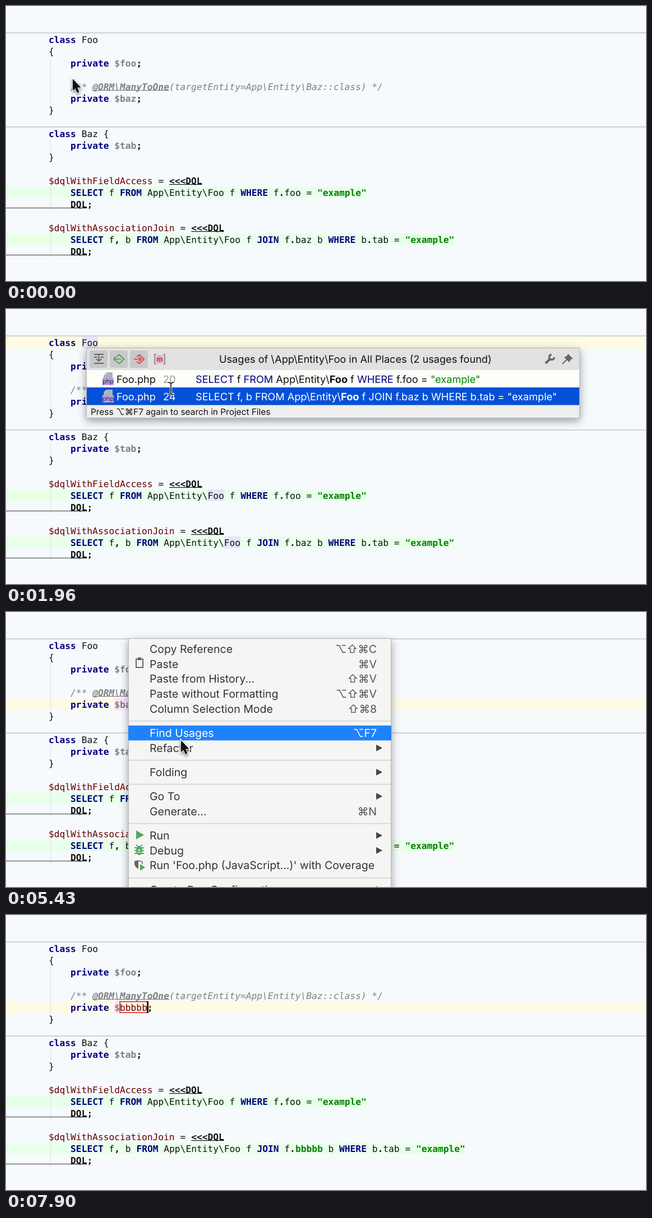
An HTML page with a canvas for the animation above (8 s loop, 1141x491 px).

```html
<!DOCTYPE html>
<html lang="en">
<head>
<meta charset="utf-8">
<title>Find usages and rename</title>
<style>
  html, body { margin: 0; width: 100%; height: 100%; overflow: hidden; background: #f6fafd; }
  canvas { display: block; width: 100%; height: 100%; }
</style>
</head>
<body>
<canvas id="stage" width="1141" height="491"></canvas>
<script>
const ctx = document.getElementById('stage').getContext('2d');
ctx.textRendering = 'geometricPrecision';

const W = 1141, H = 491, LOOP = 8000;
const LEFT = 76, CHAR = 9.775, ROW = 21, TOP = 49, BASE = 16.5;
const MONO = '16.23px "DejaVu Sans Mono", monospace';
const INTER = 'Inter, "DejaVu Sans", sans-serif';
const SMALL = '15.4px ' + INTER, MEDIUM = '18.15px ' + INTER, LARGE = '19.5px ' + INTER;
const NAVY = '#000080', GREEN = '#008000', GREY = '#808080', MAROON = '#660000';

const colX = col => LEFT + col * CHAR;
const rowY = row => TOP + row * ROW;

function rect(x, y, w, h, color) {
  ctx.fillStyle = color;
  ctx.fillRect(x, y, w, h);
}

function text(str, x, y, font, color, align = 'left') {
  ctx.font = font;
  ctx.fillStyle = color;
  ctx.textAlign = align;
  ctx.fillText(str, x, y);
}

function poly(points, fill, stroke, width = 1.5) {
  ctx.beginPath();
  points.forEach(([x, y]) => ctx.lineTo(x, y));
  ctx.closePath();
  if (stroke) { ctx.strokeStyle = stroke; ctx.lineWidth = width; ctx.stroke(); }
  if (fill) { ctx.fillStyle = fill; ctx.fill(); }
}

function line(points, color, width = 2) {
  ctx.beginPath();
  points.forEach(([x, y]) => ctx.lineTo(x, y));
  ctx.strokeStyle = color;
  ctx.lineWidth = width;
  ctx.stroke();
}

function disc(x, y, r, color) {
  ctx.fillStyle = color;
  ctx.beginPath();
  ctx.arc(x, y, r, 0, 7);
  ctx.fill();
}

function panel(x, y, w, h, color) {
  ctx.save();
  ctx.shadowColor = 'rgba(0,0,0,.38)';
  ctx.shadowBlur = 14;
  ctx.shadowOffsetY = 5;
  rect(x, y, w, h, color);
  ctx.restore();
  ctx.strokeStyle = '#b9b9b9';
  ctx.lineWidth = 1;
  ctx.strokeRect(x + .5, y + .5, w - 1, h - 1);
}

// Editor

const TOKEN = /(class|private|SELECT|FROM|JOIN|WHERE)\b|(".*?")|(\$dql\w+)|(\$\w*)|(<<<DQL|DQL)|(@ORM\\\w+)|(\/\*\* |\(target.*)|([;,.])|((?<=JOIN f\.)\w+)|./g;
const STYLES = [
  ['', '#111'], ['bold', NAVY], ['bold', GREEN], ['', MAROON], ['bold', GREY], ['bold', '#111', true],
  ['italic bold', GREY, true], ['italic', GREY], ['bold', '#111'], ['', '#111']
];
const JOIN_NAME = 9;

const codeLines = (name, renaming) => [
  'class Foo', '{', '    private $foo;', '',
  '    /** @ORM\\ManyToOne(targetEntity=App\\Entity\\Baz::class) */',
  `    private $${renaming ? ' '.repeat(name.length) : name};`, '}', '',
  'class Baz {', '    private $tab;', '}', '',
  '$dqlWithFieldAccess = <<<DQL',
  '    SELECT f FROM App\\Entity\\Foo f WHERE f.foo = "example"', '    DQL;', '',
  '$dqlWithAssociationJoin = <<<DQL',
  `    SELECT f, b FROM App\\Entity\\Foo f JOIN f.${name} b WHERE b.tab = "example"`, '    DQL;'
];

function drawLine(str, row, renaming) {
  const base = rowY(row) + BASE;
  for (const match of str.matchAll(TOKEN)) {
    const kind = Math.max(0, match.findIndex((g, i) => i && g !== undefined));
    const [weight, color, underline] = STYLES[kind === JOIN_NAME && renaming ? 2 : kind];
    const x = colX(match.index);
    text(match[0], x, base, `${weight} ${MONO}`, color);
    if (underline) rect(x, base + .5, match[0].length * CHAR, 1.2, color);
  }
}

const mark = (row, col, length, color) => rect(colX(col), rowY(row), length * CHAR, ROW, color);

function typedName(t) {
  const count = [6830, 6930, 7130, 7300, 7500].filter(at => t >= at).length;
  return count ? 'b'.repeat(count) : 'baz';
}

function caretAt(t, name) {
  if (t < 760) return null;
  if (t < 2030) return [0, 7];
  if (t < 3930) return [17, 32];
  if (t < 4760) return [0, 6];
  return [5, t < 6830 ? 15 : 13 + name.length];
}

function drawEditor(t) {
  const name = typedName(t), renaming = t >= 6450, caret = caretAt(t, name);
  const lines = codeLines(name, renaming);
  rect(0, 0, W, H, '#f6fafd');
  if (caret) rect(0, rowY(caret[0]), W, ROW, '#fffae3');
  for (const row of [13, 17]) rect(0, rowY(row) + .5, colX(lines[row].length), ROW - .5, '#e8ffe9');
  for (const y of [47.5, 215.5]) rect(0, y, W, 1, '#a9adb0');
  for (const [row, count] of [[2, 4], [9, 1], [13, 2], [17, 2]])
    rect(79, rowY(row), 1, count * ROW, '#dbdfe2');
  for (const row of [14, 18]) rect(0, rowY(row) + BASE + .5, colX(4), 1.2, '#555');

  if (t >= 1030 && t < 4760)
    for (const [row, col] of [[0, 6], [13, 29], [17, 32]]) mark(row, col, 3, '#e5e5fb');
  if (t >= 4760) mark(5, 12, renaming ? 1 : 4, '#ffe4f7');
  if (renaming && t < 7830) mark(17, 45, name.length, '#c6c8f5');

  lines.forEach((str, row) => drawLine(str, row, renaming));

  if (renaming) {
    const selected = t < 6830;
    if (selected) mark(5, 13, 3, '#3f6fb4');
    text(name, colX(13), rowY(5) + BASE, MONO, selected ? '#fff' : MAROON);
    ctx.strokeStyle = '#e0161c';
    ctx.lineWidth = 1.5;
    ctx.strokeRect(colX(13), rowY(5) + .7, name.length * CHAR, ROW - 1.4);
  }
  const popupOpen = t >= 1130 && t < 2030;
  if (caret && !popupOpen) rect(colX(caret[1]) - .6, rowY(caret[0]), 2.6, ROW, '#000');
}

// Usages popup

function fileIcon(x, y) {
  poly([[x + 7, y], [x + 17, y], [x + 17, y + 12], [x + 1, y + 12], [x + 1, y + 6]], '#a9b4bc');
  poly([[x + 1, y + 5], [x + 6, y], [x + 6, y + 5]], '#c6ced4');
  rect(x - 1, y + 10, 20, 13, '#b9a0e0');
  text('php', x + 9, y + 19.5, `11px ${INTER}`, '#2d2146', 'center');
}

// A diamond open on its left side, with an arrow leaving (-1) or entering (1)
function diamondIcon(x, y, color, direction) {
  ctx.save();
  ctx.translate(x, y);
  line([[-4, -4], [1, -8], [9, 0], [1, 8], [-4, 4]], color);
  line([[-9, 0], [4, 0]], color);
  const tip = direction < 0 ? -9 : 4, back = tip - 4 * direction;
  line([[back, -4], [tip, 0], [back, 4]], color);
  ctx.restore();
}

function popupToolbar() {
  for (const x of [149, 185, 221]) {
    ctx.fillStyle = '#c8c8c8';
    ctx.beginPath();
    ctx.roundRect(x, 74, 32, 31, 4);
    ctx.fill();
  }
  for (const y of [81, 97]) line([[157, y], [174, y]], '#666');
  line([[157, 86], [162, 86]], '#666');
  line([[169, 86], [174, 86]], '#666');
  line([[165.5, 82], [165.5, 92]], '#666');
  line([[161, 89], [165.5, 93], [170, 89]], '#666');
  diamondIcon(201, 89.5, '#4fa35b', -1);
  diamondIcon(237, 89.5, '#e0474c', 1);
  disc(274, 89.5, 7.5, '#f4a3ae');
  text('m', 274, 94, `12px ${INTER}`, '#4d2730', 'center');
  line([[268, 81], [265, 81], [265, 98], [268, 98]], '#777', 1.5);
  line([[280, 81], [283, 81], [283, 98], [280, 98]], '#777', 1.5);

  line([[962, 97], [971, 88]], '#666', 4);
  ctx.beginPath();
  ctx.arc(973, 86, 4.5, .1, 4.6);
  ctx.lineWidth = 3.5;
  ctx.stroke();
  poly([[1002, 80], [1011, 89], [1007, 90], [1004, 95], [995, 86], [1000, 84]], '#666');
  line([[1000, 90], [992, 98]], '#666', 2);
}

function usageRow(y, number, query, selected) {
  if (selected) rect(144, y, 878, 31.5, '#0550d8');
  fileIcon(173, y + 4);
  const base = y + 22.5;
  text('Foo.php', 197, base, MEDIUM, selected ? '#fff' : '#111');
  text(number, 280, base, MEDIUM, selected ? '#fff' : '#999');
  let x = 338;
  for (const part of query.split(/(SELECT|FROM|JOIN|WHERE|Foo|".*")/)) {
    const color = part[0] === '"' ? GREEN : /^[A-Z]+$/.test(part) ? NAVY : '#111';
    text(part, x, base, (part === 'Foo' ? 'bold ' : '') + MEDIUM, selected ? '#fff' : color);
    x += ctx.measureText(part).width;
  }
}

function drawUsages(t) {
  if (t < 1130 || t >= 2000) return;
  panel(143, 69, 880, 126, '#fdfdfa');
  rect(144, 70, 878, 39, '#e1e1e1');
  popupToolbar();
  text('Usages of \\App\\Entity\\Foo in All Places (2 usages found)', 380, 95.5, MEDIUM, '#111');
  rect(144, 171, 878, 23, '#eeeeee');
  const second = t >= 1960;
  usageRow(109, '20', 'SELECT f FROM App\\Entity\\Foo f WHERE f.foo = "example"', !second);
  usageRow(140, '24', 'SELECT f, b FROM App\\Entity\\Foo f JOIN f.baz b WHERE b.tab = "example"', second);
  text('Press ⌥⌘F7 again to search in Project Files', 151, 189, SMALL, '#111');
}

// Menus: each entry is [centre y, label, shortcut]; '>' opens a submenu

const MENU = [
  [66, 'Copy Reference', '⌥⇧⌘C'], [92.7, 'Paste', '⌘V'], [119.3, 'Paste from History...', '⇧⌘V'],
  [146, 'Paste without Formatting', '⌥⇧⌘V'], [172.5, 'Column Selection Mode', '⇧⌘8'],
  [216, 'Find Usages', '⌥F7'], [242.7, 'Refactor', '>'], [286, 'Folding', '>'],
  [329, 'Go To', '>'], [355.7, 'Generate...', '⌘N'], [399, 'Run', '>'], [425.7, 'Debug', '>'],
  [452.3, "Run 'Foo.php (JavaScript...)' with Coverage", ''], [495.5, 'Create Run Configuration', '>']
];
const SUBMENU = [
  [242.7, 'Rename...', '⇧F6'], [269.3, 'Move...', 'F6'], [296, 'Copy...', 'F5'], [322.7, 'Safe Delete...', '⌘⌫'],
  [366, 'Extract', '>'], [392.7, 'Inline...', '⌥⌘N'],
  [436, 'Pull Members Up...', ''], [462.7, 'Push Members Down...', '']
];

function menu(entries, separators, x, y, w, isActive) {
  panel(x, y, w, H + 40 - y, '#f5f5f4');
  for (const sep of separators) rect(x + 1, sep - 1, w - 2, 2.5, '#dedede');
  for (const [cy, label, key] of entries) {
    const active = isActive(cy, label);
    if (active) rect(x, cy - 13.3, w, 26.6, '#1f82fd');
    text(label, x + 38, cy + 7, LARGE, active ? '#fff' : '#333');
    const right = x + w - 26;
    if (key === '>') poly([[right - 1, cy - 6], [right + 10, cy], [right - 1, cy + 6]], active ? '#fff' : '#444');
    else text(key, right, cy + 7, LARGE, active ? '#fff' : '#555', 'right');
  }
}

function menuIcons() {
  ctx.strokeStyle = '#666';
  ctx.lineWidth = 2;
  ctx.strokeRect(232, 84, 12, 15);
  rect(235, 81, 6, 5, '#666');
  poly([[232, 390], [246, 398], [232, 406]], '#4fa860');
  for (const dy of [-4, 1, 6]) line([[229, 425 + dy], [246, 425 + dy]], '#4fa860');
  ctx.fillStyle = '#4fa860';
  ctx.beginPath();
  ctx.ellipse(237.5, 426, 5.5, 8, 0, 0, 7);
  ctx.fill();
  line([[232, 416], [237.5, 420], [243, 416]], '#4fa860');
  line([[235, 425], [240, 425]], '#fff', 1.5);
  line([[235, 429], [240, 429]], '#fff', 1.5);
  poly([[229, 445], [236, 443], [236, 459], [231, 455], [229, 451]], '#666');
  line([[236, 444], [243, 446], [243, 450]], '#666', 1.5);
  poly([[239, 450], [248, 456], [239, 462]], '#4fa860');
}

function drawMenus(t, [x, y]) {
  if (t < 4860 || t >= 6400) return;
  const overMenu = x > 219 && x < 687;
  menu(MENU, [194.5, 264.5, 307.5, 377.5, 474.5], 218, 47, 469, (cy, label) =>
    overMenu ? Math.abs(y - cy) < 13.3 : x >= 687 && label === 'Refactor');
  menuIcons();
  if (t >= 5660) menu(SUBMENU, [344.5, 414.5, 484.5], 686, 224, 326, cy => x >= 687 && Math.abs(y - cy) < 13.3);
}

// Rename popup

function drawRename(t) {
  if (t < 6450 || t >= 7900) return;
  ctx.globalAlpha = t < 7830 ? 1 : .5;
  panel(190, 175, 353, 47, '#f0f0f0');
  rect(191, 176, 351, 23, '#e9f4fd');
  text('baz', 203, 193, MONO, '#111');
  text('Press ⇧F6 to show dialog with more options', 191.5, 215.5, SMALL, '#111');
  ctx.globalAlpha = 1;
}

// Pointer path: [time, x, y]

const PATH = [
  [0, 118, 129], [30, 118, 129], [400, 150, 12], [640, 147, 48], [800, 147, 57],
  [930, 147, 57], [1630, 294, 142], [2700, 294, 142], [2850, 150, 200], [3050, 24, 320],
  [3200, 200, 400], [3350, 455, 418], [3500, 409, 421], [3930, 409, 421], [4300, 388, 389],
  [4730, 221, 166], [4860, 221, 166], [5430, 311, 228], [5500, 311, 236], [5800, 311, 236],
  [6300, 771, 236], [LOOP, 771, 236]
];

function pointerAt(t) {
  const i = PATH.findIndex(([time]) => time > t);
  const [t0, x0, y0] = PATH[i - 1], [t1, x1, y1] = PATH[i];
  const k = (t - t0) / (t1 - t0);
  return [x0 + (x1 - x0) * k, y0 + (y1 - y0) * k];
}

function drawPointer(t, [x, y]) {
  if (t >= 6830) return;
  ctx.save();
  ctx.translate(x, y);
  if (t < 600 || (t >= 4860 && t < 6400)) {
    ctx.shadowColor = 'rgba(0,0,0,.35)';
    ctx.shadowBlur = 4;
    ctx.shadowOffsetY = 2;
    poly([[1, 1], [1, 22], [5.5, 18], [9, 26], [12.5, 24.5], [9, 16.5], [15.5, 16.5]], '#111', '#fff', 3);
  } else {
    for (const [color, width] of [['rgba(255,255,255,.8)', 4], ['#3a3a3a', 2]]) {
      line([[0, -9], [0, 9]], color, width);
      for (const s of [-1, 1]) line([[-5, 11 * s], [-2, 10.5 * s], [0, 8.5 * s], [2, 10.5 * s], [5, 11 * s]], color, width);
      line([[-3, 3], [3, 3]], color, width * .8);
    }
  }
  ctx.restore();
}

function frame() {
  const t = performance.now() % LOOP, pointer = pointerAt(t);
  drawEditor(t);
  drawUsages(t);
  drawMenus(t, pointer);
  drawRename(t);
  drawPointer(t, pointer);
  requestAnimationFrame(frame);
}
frame();
</script>
</body>
</html>
```
